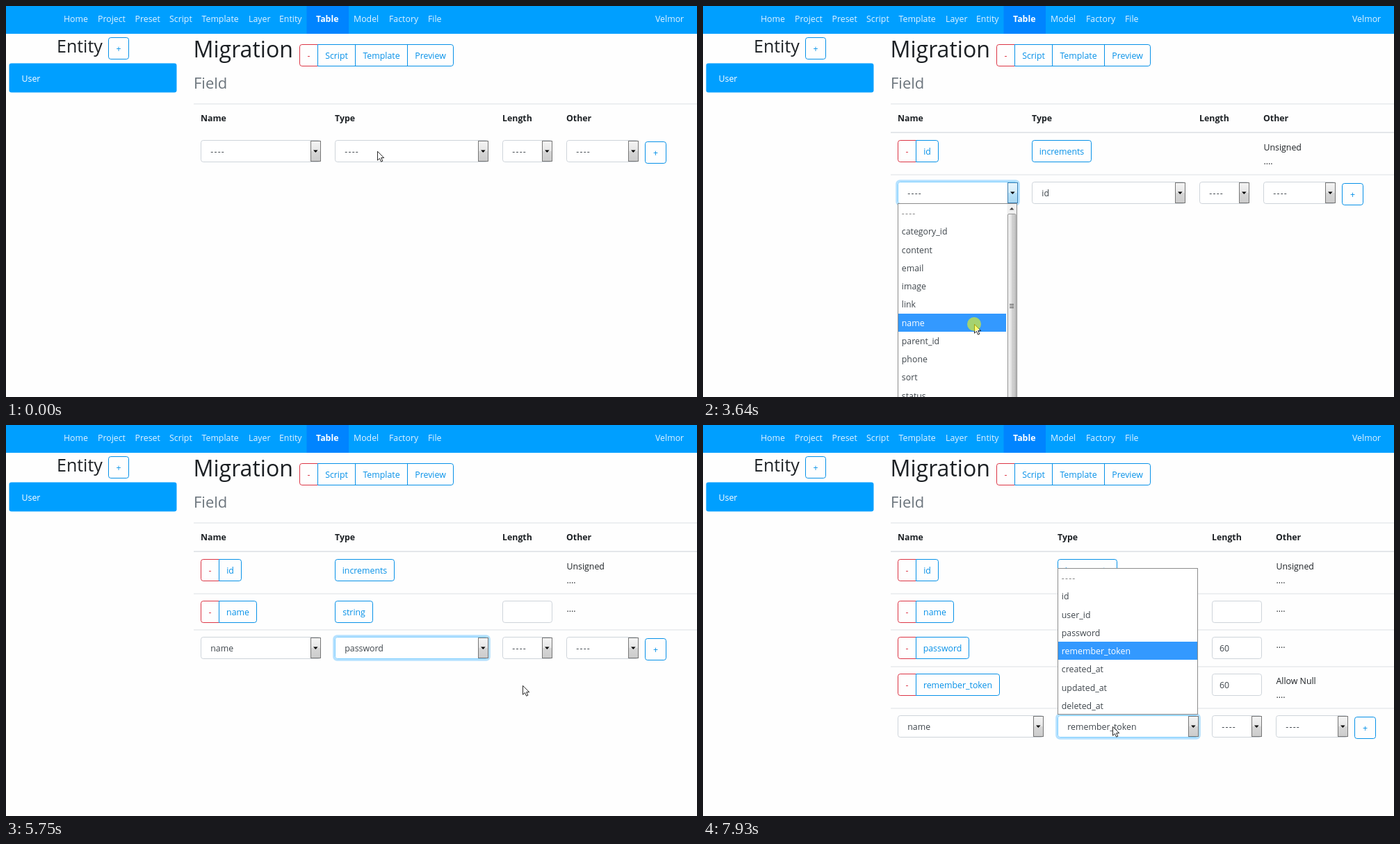
An HTML page for the animation above (8 s loop, 994 by 563 pixels).

```html
<!DOCTYPE html>
<html lang="en">
<head>
<meta charset="utf-8">
<title>Migration table</title>
<style>
  html, body { margin: 0; width: 100%; height: 100%; overflow: hidden; background: #fefefe; }
  svg { display: block; width: 994px; height: 563px; }
  text { font-family: "Open Sans", "Noto Sans", sans-serif; font-size: 12.35px; white-space: pre; }
  .dash { letter-spacing: 1.2px; }
</style>
</head>
<body>
<svg id="stage" viewBox="0 0 994 563">
  <defs>
    <linearGradient id="grey" x2="0" y2="1">
      <stop offset="0" stop-color="#f4f4f4"/><stop offset=".5" stop-color="#e6e6e6"/>
      <stop offset=".5" stop-color="#d6d6d6"/><stop offset="1" stop-color="#cccccc"/>
    </linearGradient>
    <linearGradient id="hot" x2="0" y2="1">
      <stop offset="0" stop-color="#e8f5fc"/><stop offset=".5" stop-color="#d5edfb"/>
      <stop offset=".5" stop-color="#bce2f8"/><stop offset="1" stop-color="#a7d7f2"/>
    </linearGradient>
    <linearGradient id="thumb">
      <stop offset="0" stop-color="#f3f3f3"/><stop offset=".5" stop-color="#e2e2e2"/>
      <stop offset=".5" stop-color="#d2d2d2"/><stop offset="1" stop-color="#c6c6c6"/>
    </linearGradient>
  </defs>
  <g id="fixed"></g>
  <g id="live"></g>
</svg>
<script>
const LOOP = 8000, STEP = 77.94, PHASE = 48;
const BLUE = '#0691e8', RED = '#dc3545', BAR = '#009fff', INK = '#1c2024', FIELD = '#3f464c', LINE = '#dee2e6';
const ITEM = 26.25;

const TYPES = ['----', 'id', 'user_id', 'password', 'remember_token', 'created_at', 'updated_at', 'deleted_at'];
const NAMES = ['----', 'category_id', 'content', 'email', 'image', 'link', 'name', 'parent_id', 'phone', 'sort', 'status'];
const ROWS = [
  { name: 'id', type: 'increments', typeW: 85, note: 'Unsigned', w: 32 },
  { name: 'name', type: 'string', typeW: 54, len: '', w: 54 },
  { name: 'password', type: 'char', typeW: 45, len: '60', w: 76 },
  { name: 'remember_token', type: 'char', typeW: 45, len: '60', note: 'Allow Null', w: 120 }
];
const TOPS = [193.5, 253.5, 305.5, 358.5, 418.5];

// All times below are counted in steps of STEP ms.
const ROW_AT = [21, 51, 75, 90];
const CLICKS = [[4, 6], [15, 17], [20, 21], [26, 29], [46, 47], [50, 51], [56, 59],
  [71, 72], [74, 75], [77, 80], [86, 87], [89, 90], [97, 100]];
const OPEN = [['type', 5, 16], ['name', 27, 47], ['type', 57, 72], ['type', 78, 87], ['type', 98, 999]];
const FOCUS = [[0, ''], [5, 'type'], [27, 'name'], [57, 'type']];
const NAME_VALUE = [[0, 0], [47, 6]];
const TYPE_VALUE = [[0, 0], [16, 1], [72, 3], [87, 4]];
const PATH = [[0, 534, 209], [7, 534, 209], [13, 534, 268], [16, 534, 268], [19, 934, 211], [21, 934, 211],
  [25, 390, 270], [30, 390, 270], [33, 393, 313], [34, 394, 314], [35, 394, 314], [41, 390, 458],
  [47, 390, 458], [49, 934, 270], [51, 934, 270], [54, 538, 315], [62, 538, 315], [64, 545, 394],
  [65, 547, 405], [69, 552, 428], [72, 552, 428], [74, 934, 322], [75, 934, 322], [77, 567, 378],
  [81, 567, 378], [82, 574, 426], [83, 578, 446], [85, 584, 508], [87, 584, 508], [89, 934, 374],
  [90, 934, 374], [92, 600, 500], [96, 589, 434]];

const latest = (table, k) => table.filter(e => e[0] <= k).pop()[1];

function cursorAt(k) {
  const i = PATH.findIndex(p => p[0] > k);
  if (i < 0) return PATH[PATH.length - 1].slice(1);
  const a = PATH[i - 1], b = PATH[i], u = (k - a[0]) / (b[0] - a[0]), e = u * u * (3 - 2 * u);
  return [a[1] + (b[1] - a[1]) * e, a[2] + (b[2] - a[2]) * e];
}

function text(x, y, s, fill = INK, extra = '') {
  return `<text x="${x}" y="${y}" fill="${fill}" ${s === '----' ? 'class="dash"' : ''} ${extra}>${s}</text>`;
}
const bold = (x, y, s, fill) => text(x, y, s, fill, 'font-weight="700"');
const sized = (x, y, s, size, fill) => text(x, y, s, fill, `style="font-size:${size}px"`);
const centred = (x, y, s, fill) => text(x, y, s, fill, 'text-anchor="middle"');

function rect(x, y, w, h, fill, stroke = 'none', r = 0) {
  return `<rect x="${x}" y="${y}" width="${w}" height="${h}" rx="${r}" fill="${fill}" stroke="${stroke}"/>`;
}
const rule = (y, h = 1) => rect(270, y, 724, h, LINE);
const outline = (d, stroke) => `<path d="${d}" fill="none" stroke="${stroke}"/>`;

function button(x, y, w, label, color = BLUE) {
  return rect(x, y, w, 31, 'none', color, 3.3) + centred(x + w / 2, y + 20, label, color);
}

// A red "-" joined to further blue buttons.
function group(x, y, parts) {
  const split = x + 26, total = parts.reduce((sum, p) => sum + p[1], 0);
  let s = outline(`M${split} ${y}h-22.7a3.3 3.3 0 0 0-3.3 3.3v24.4a3.3 3.3 0 0 0 3.3 3.3h22.7`, RED) +
    outline(`M${split} ${y}h${total - 3.3}a3.3 3.3 0 0 1 3.3 3.3v24.4a3.3 3.3 0 0 1-3.3 3.3H${split}`, BLUE) +
    centred(x + 13, y + 20, '-', RED);
  let left = split;
  for (const [label, w] of parts) {
    s += outline(`M${left} ${y}v31`, BLUE) + centred(left + w / 2, y + 20, label, BLUE);
    left += w;
  }
  return s;
}

function select(x, y, w, value, focused, hot) {
  const right = x + w;
  const glow = focused ? rect(x - 1.8, y - 1.8, w + 3.6, 34.6, 'none', '#b5e1ff" stroke-width="3', 4.5) : '';
  return glow + rect(x, y, w, 31, '#fff', focused ? '#80cfff' : '#ced4da', 3.3) +
    text(x + 13.8, y + 20, value, FIELD) +
    rect(right - 14, y + 1, 14, 29, `url(#${hot ? 'hot' : 'grey'})`, hot ? '#3c7fb1' : '#777') +
    `<path d="M${right - 10.5} ${y + 14}h6.6l-3.3 3.6z" fill="#000"/>`;
}

function list(x, y, w, items, active, scroll) {
  const h = scroll ? 400 : ITEM * items.length;
  const inner = scroll ? w - 15 : w;
  let s = rect(x, y, w, h, '#fff', '#8c8c8c');
  items.forEach((item, i) => {
    const on = i === active, top = Math.round(y + i * ITEM + .5);
    if (on) s += rect(x + .5, top, inner - 1, 26, '#3399ff');
    s += text(x + 5.3, top + 18, item, on ? '#fff' : i ? FIELD : '#808080');
  });
  if (scroll) {
    const left = x + w - 14;
    s += rect(left, y + .5, 13.5, h, '#f0f0f0') +
      `<path d="M${left + 3.5} ${y + 9}l3.2-3.4l3.2 3.4z" fill="#444"/>` +
      rect(left + 1, y + 15, 11.5, 265, 'url(#thumb)', '#979797', 1.5);
    for (let i = 0; i < 3; i++) s += rect(left + 3.5, y + 144.5 + i * 2.5, 6, 1, '#555');
  }
  return s;
}

function header() {
  const links = [['Home', 83], ['Project', 132], ['Preset', 185.5], ['Script', 235], ['Template', 281.5], ['Layer', 349],
    ['Entity', 393], ['Model', 500], ['Factory', 551], ['File', 607], ['Velmor', 934]];
  return rect(0, 0, 994, 40, BAR) + rect(432.5, 0, 60.5, 40, '#0084ff') +
    links.map(([s, x]) => text(x, 22.5, s, '#e0f3ff')).join('') + bold(446, 22.5, 'Table', '#fff') +
    sized(73, 67, 'Entity', 25, INK) + button(147.5, 45.5, 29, '+') +
    rect(4.5, 82.5, 241, 42, BAR, 'none', 3.3) + text(22.5, 108.5, 'User', '#fff') +
    sized(269.5, 74, 'Migration', 32.1, INK) + sized(270, 119, 'Field', 22, '#6c757d') +
    group(422.5, 55.5, [['Script', 54], ['Template', 75], ['Preview', 66]]) + rule(140.5);
}

function row(r, i, col) {
  const y = TOPS[i];
  let s = group(280.5, y, [[r.name, r.w]]) + button(col.type, y, r.typeW, r.type);
  if (r.len !== undefined) s += rect(col.len, y, 71, 31, '#fff', '#ced4da', 3.3) + text(col.len + 10.5, y + 20, r.len, FIELD);
  if (r.note) s += text(col.other, y + 14.3, r.note);
  return s + text(col.other, y + (r.note ? 34.5 : 15), '....') + rule(TOPS[i + 1] - 11);
}

function pointer(k) {
  const [x, y] = cursorAt(k);
  const arrow = `<path transform="translate(${x.toFixed(1)} ${y.toFixed(1)})" d="M.5 .3V13.2L3.5 10.4L5.6 15.2L7.8 14.2L5.7 9.6H9.7Z" fill="#fff" stroke="#111" stroke-width=".9"/>`;
  const down = CLICKS.some(([a, b]) => k >= a && k < b);
  return arrow + (down ? `<circle cx="${x}" cy="${y}" r="10" fill="#ff0" fill-opacity=".56"/>` : '');
}

function scene(k) {
  const count = ROW_AT.filter(at => at <= k).length;
  const wide = count > 3;
  const col = wide ? { type: 510.5, len: 732.5, other: 824.5 } : { type: 473.5, len: 714.5, other: 806.5 };
  const nameW = wide ? 209 : 172, typeW = wide ? 202 : 220;
  const top = TOPS[count], focus = latest(FOCUS, k);
  const nameIdx = latest(NAME_VALUE, k), typeIdx = latest(TYPE_VALUE, k);
  const open = OPEN.find(o => k >= o[1] && k < o[2]);
  const hot = key => open && open[0] === key && k < 78;

  let s = bold(280, 166.3, 'Name') + bold(col.type - .5, 166.3, 'Type') +
    bold(col.len - .5, 166.3, 'Length') + bold(col.other - .5, 166.3, 'Other');
  if (count) s += rule(181.4, 1.6);
  s += ROWS.slice(0, count).map((r, i) => row(r, i, col)).join('');
  s += select(280.5, top, nameW, NAMES[nameIdx], focus === 'name', hot('name')) +
    select(col.type, top, typeW, TYPES[typeIdx], focus === 'type', hot('type')) +
    select(col.len, top, 71, '----') + select(col.other, top, 103, '----') +
    button(col.other + 113, top + 2, 30, '+');

  if (open) {
    const isName = open[0] === 'name', items = isName ? NAMES : TYPES;
    const y = wide ? top - 212 : top + 31;
    // The highlight trails the pointer by one step.
    const over = Math.floor((cursorAt(Math.max(0, k - 1))[1] - y) / ITEM);
    const active = over >= 0 && over < items.length ? over : isName ? nameIdx : typeIdx;
    s += list(isName ? 280.5 : col.type, y, (isName ? nameW : typeW) - 1, items, active, isName);
  }
  return s + pointer(k);
}

const live = document.getElementById('live');
document.getElementById('fixed').innerHTML = header();
let shown = -1;
function tick() {
  const t = performance.now() % LOOP;
  const k = Math.max(0, Math.floor((t - PHASE) / STEP));
  if (k !== shown) {
    live.innerHTML = scene(k);
    shown = k;
  }
  requestAnimationFrame(tick);
}
tick();
</script>
</body>
</html>
```
